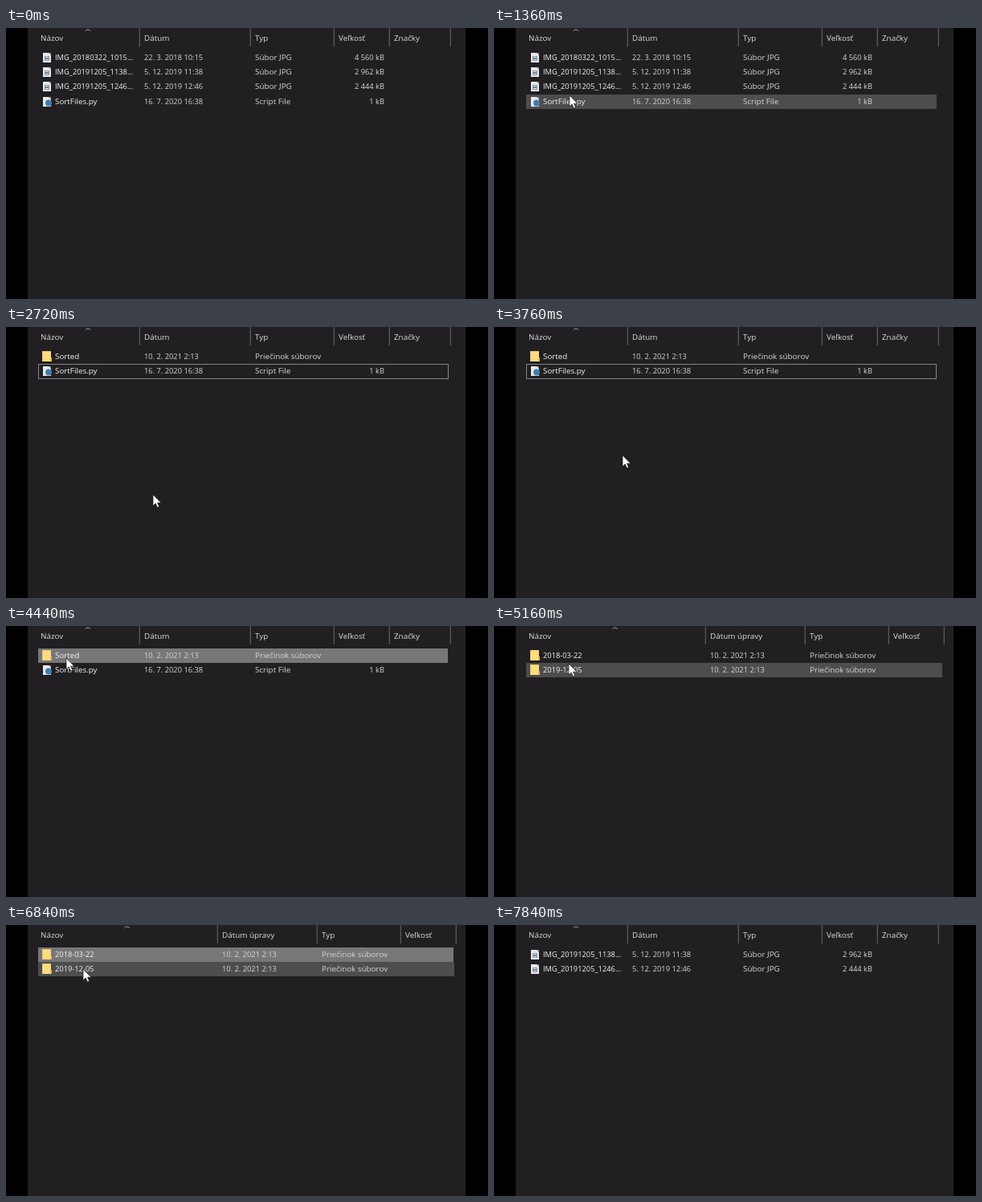
Write an HTML page with a canvas that moves like this. It is 600 by 338 pixels and loops after 9.12 s.

```html
<!DOCTYPE html>
<html lang="sk">
<head>
<meta charset="utf-8">
<title>Sorting files</title>
<style>
html, body { margin: 0; width: 100%; height: 100%; overflow: hidden; background: #000; }
canvas { display: block; }
</style>
</head>
<body>
<canvas id="stage" width="600" height="338"></canvas>
<script>
const ctx = document.getElementById('stage').getContext('2d');
const LOOP = 9120, STEP = 40;
const LEFT = 40, ROW_TOP = 28, ROW_HEIGHT = 18.2;
const BRIGHT = '#f4f4f4', SOFT = '#d8d8d8';

// Each column is a title and the x of the line that closes it
const fileColumns = [['Názov', 166], ['Dátum', 304], ['Typ', 408], ['Veľkosť', 477], ['Značky', 553]];
const folderColumns = [['Názov', 263], ['Dátum úpravy', 387], ['Typ', 491], ['Veľkosť', 560]];

const image = (name, date, size) => ({ icon: drawImageIcon, cells: [name, date, 'Súbor JPG'], size });
const folder = name => ({ icon: drawFolderIcon, cells: [name, '10. 2. 2021 2:13', 'Priečinok súborov'], size: '' });
const script = { icon: drawScriptIcon, cells: ['SortFiles.py', '16. 7. 2020 16:38', 'Script File'], size: '1 kB' };
const winter = [
  image('IMG_20191205_1138...', '5. 12. 2019 11:38', '2 962 kB'),
  image('IMG_20191205_1246...', '5. 12. 2019 12:46', '2 444 kB')
];

const unsorted = {
  columns: fileColumns,
  rows: [image('IMG_20180322_1015...', '22. 3. 2018 10:15', '4 560 kB'), ...winter, script]
};
const cleaned = { columns: fileColumns, rows: [folder('Sorted'), script] };
const dates = { columns: folderColumns, rows: [folder('2018-03-22'), folder('2019-12-05')] };
const december = { columns: fileColumns, rows: winter };

const scenes = [
  { from: 0, view: unsorted },
  { from: 1880, view: unsorted, selected: 3 },
  { from: 2720, view: cleaned, focused: 1 },
  { from: 4400, view: cleaned, selected: 0 },
  { from: 4560, view: dates },
  { from: 5520, view: dates, selected: 0 },
  { from: 5640, view: null },
  { from: 6520, view: dates, selected: 0 },
  { from: 7080, view: dates, selected: 1 },
  { from: 7160, view: december }
];

// The pointer rests between moves
const entry = { x: 182, y: 334 };
const moves = [
  { from: 920, to: 1340, x: 94, y: 84 },
  { from: 1400, to: 1840, x: 90, y: 94 },
  { from: 2080, to: 2320, x: 183, y: 209 },
  { from: 3240, to: 3360, x: 191, y: 204 },
  { from: 3520, to: 4230, x: 75, y: 40 },
  { from: 4520, to: 4680, x: 112, y: 104 },
  { from: 4680, to: 5320, x: 90, y: 36 },
  { from: 5640, to: 6200, x: 154, y: 128 },
  { from: 6480, to: 6840, x: 96, y: 55 },
  { from: 7120, to: 7320, x: 191, y: 177 },
  { from: 7680, to: 7840, x: 18, y: 158 }
];

const clamp = v => Math.min(1, Math.max(0, v));
const smooth = p => p * p * (3 - 2 * p);

function pointerAt(t) {
  if (t < 960 || t >= 7840) return null;
  let { x, y } = entry;
  for (const move of moves) {
    const p = smooth(clamp((t - move.from) / (move.to - move.from)));
    x += (move.x - x) * p;
    y += (move.y - y) * p;
  }
  return { x: Math.round(x), y: Math.round(y) };
}

function rect(x, y, w, h, color) {
  ctx.fillStyle = color;
  ctx.fillRect(x, y, w, h);
}

function frame(x, y, w, h, color) {
  ctx.strokeStyle = color;
  ctx.lineWidth = 1;
  ctx.strokeRect(x + .5, y + .5, w - 1, h - 1);
}

function shape(points, color) {
  ctx.beginPath();
  points.forEach(([x, y]) => ctx.lineTo(x, y));
  ctx.closePath();
  ctx.fillStyle = color;
  ctx.fill();
}

function arc(x, y, r, start, sweep, color, width) {
  ctx.beginPath();
  ctx.arc(x, y, r, start, start + sweep);
  ctx.strokeStyle = color;
  ctx.lineWidth = width;
  ctx.stroke();
}

function text(str, x, y, color, align = 'left') {
  const size = /\d/.test(str) ? 9.3 : 9.85;
  ctx.font = `${size}px "Open Sans", "Noto Sans", sans-serif`;
  ctx.textAlign = align;
  ctx.fillStyle = color;
  ctx.fillText(str, x, y);
}

function drawPage(y) {
  rect(46, y - 6, 10, 12, '#e9e9e9');
  shape([[53, y - 6], [56, y - 6], [56, y - 3]], '#8d8d8d');
}

function drawImageIcon(y) {
  drawPage(y);
  frame(48, y - 2, 6, 6, '#8793a6');
  rect(49, y, 4, 2, '#5f7fa8');
}

function drawFolderIcon(y) {
  rect(45, y - 7, 11, 13, '#f3cd66');
  rect(46, y - 6, 10, 12, '#fbdc82');
  rect(55, y + 1, 2, 5, '#e9b94c');
}

function drawScriptIcon(y) {
  drawPage(y);
  arc(53, y + 1.5, 2, 0, Math.PI * 2, '#3f7cae', 4);
}

function drawHeader(columns) {
  let x = 43;
  for (const [title, line] of columns) {
    text(title, x, 15.5, '#dcdcdc');
    rect(line - .25, 0, 1, 23, '#6a696b');
    x = line + 6;
  }
  const caret = (38 + columns[0][1]) / 2;
  arc(caret, 5.5, 3.5, -Math.PI * .85, Math.PI * .7, '#a5a5a5', 1);
}

function drawList({ view, selected, focused }, pointer) {
  const { columns, rows } = view;
  const width = columns.at(-1)[1] - 3 - LEFT;
  const inside = pointer && pointer.x >= LEFT && pointer.x < LEFT + width;
  const hovered = inside ? Math.floor((pointer.y - ROW_TOP) / ROW_HEIGHT) : -1;
  const cellX = [61, columns[0][1] + 6, columns[1][1] + 6];
  drawHeader(columns);
  rows.forEach((row, i) => {
    const top = Math.round(ROW_TOP + i * ROW_HEIGHT), mid = top + 9;
    if (i === selected) rect(LEFT, top, width, 18, '#777678');
    else if (i === hovered) rect(LEFT, top, width + 1, 18, '#4d4c4e');
    else if (i === focused) frame(LEFT, top, width + 1, 19, '#858585');
    row.icon(mid);
    row.cells.forEach((cell, c) => text(cell, cellX[c], mid + 3.2, c ? SOFT : BRIGHT));
    text(row.size, 471, mid + 3.2, SOFT, 'right');
  });
}

function drawPhoto() {
  const haze = ctx.createLinearGradient(0, 43, 0, 88);
  haze.addColorStop(0, '#c9bda6');
  haze.addColorStop(.35, '#cfc7b6');
  haze.addColorStop(.5, '#8f938f');
  haze.addColorStop(1, '#6c6a4c');
  rect(45, 43, 78, 45, haze);
  shape([[78, 74], [98, 62], [123, 60], [123, 88], [88, 88]], '#858450');
  rect(64, 74, 13, 4, '#d0d1ca');
  rect(87, 48, 1, 15, '#eee8d9');
  text('IMG_20180322_10', 86, 101.5, BRIGHT, 'center');
  text('1529.jpg', 86, 114.5, BRIGHT, 'center');
}

function drawArrow({ x, y }) {
  const outline = [[0, 0], [0, 14], [3.2, 11], [5.4, 16], [7.7, 15], [5.5, 10.2], [10, 10.2]];
  shape(outline.map(([dx, dy]) => [x + dx, y + dy]), '#ffffff');
  ctx.strokeStyle = '#161616';
  ctx.lineWidth = .7;
  ctx.stroke();
}

function drawSpinner({ x, y }, t) {
  arc(x, y + .5, 6.8, 0, Math.PI * 2, '#3a87c4', 3.6);
  arc(x, y + .5, 6.8, t / 130, 1.5, '#56a5dc', 3.6);
}

function draw(t) {
  rect(0, 0, 600, 338, '#000000');
  rect(27, 0, 545, 338, '#211f22');
  const scene = scenes.findLast(s => s.from <= t);
  const pointer = pointerAt(t);
  if (scene.view) drawList(scene, pointer);
  else drawPhoto();
  if (!pointer) return;
  if (t >= 1960 && t < 2160) drawSpinner(pointer, t);
  else drawArrow(pointer);
}

const begin = performance.now();
function tick() {
  const t = (performance.now() - begin) % LOOP;
  draw(Math.floor(t / STEP) * STEP);
  requestAnimationFrame(tick);
}
tick();
</script>
</body>
</html>
```
